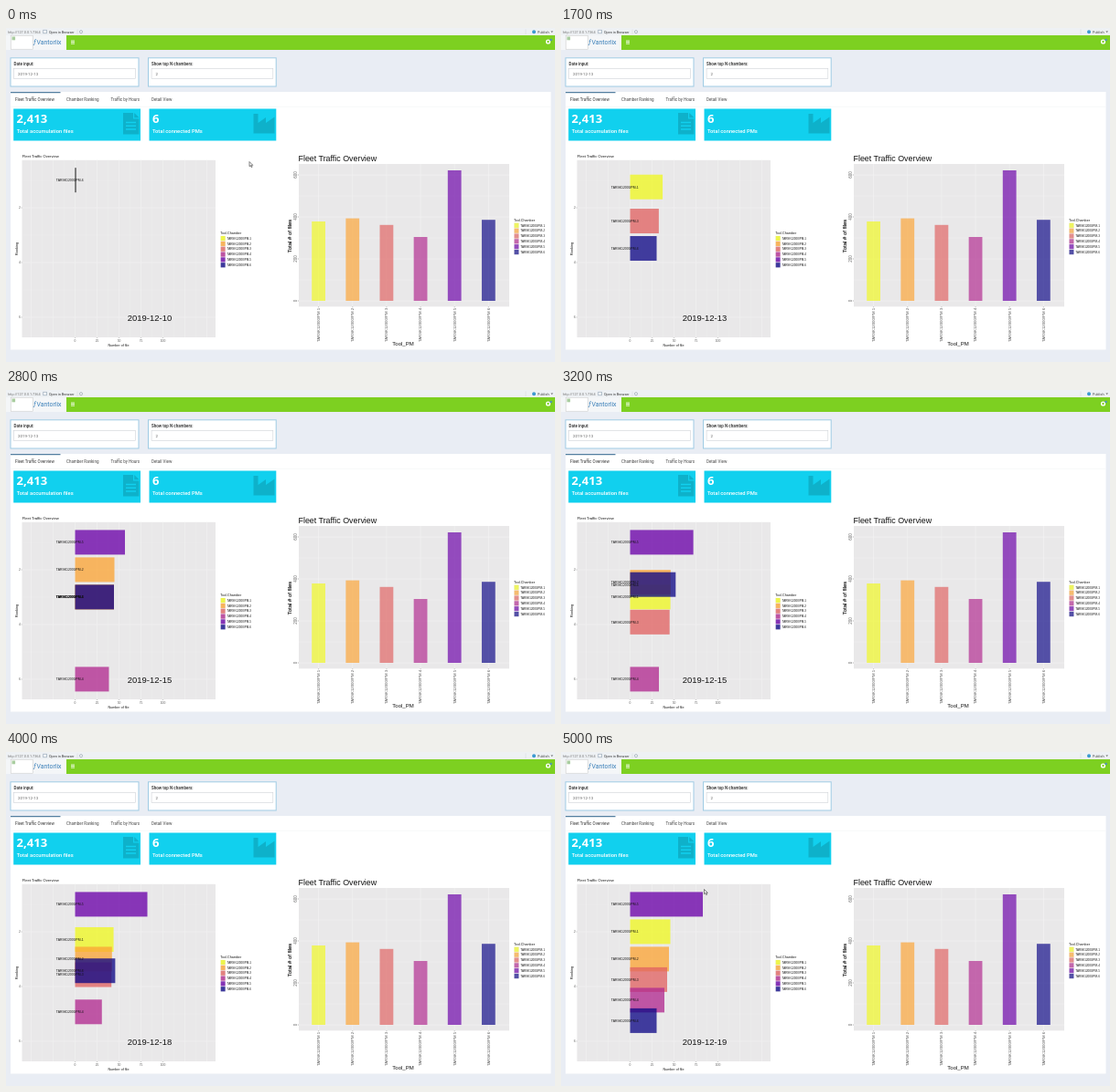
An HTML page that plays this animation: 600 px wide and 366 px high, repeating every 5100 ms.

```html
<!DOCTYPE html>
<html lang="en">
<head>
<meta charset="utf-8">
<title>Fleet dashboard</title>
<style>
  html, body { margin: 0; width: 100%; height: 100%; overflow: hidden; background: #e9edf4; }
  svg { display: block; width: 600px; height: 366px; }
  text { font-family: "Liberation Sans", Arial, sans-serif; white-space: pre; }
  .ui { font-family: Roboto, sans-serif; }
</style>
</head>
<body>
<svg id="stage" viewBox="0 0 600 366"></svg>
<script>
const NS = 'http://www.w3.org/2000/svg';
const stage = document.getElementById('stage');
const COLORS = ['#f0f921', '#fca636', '#e16462', '#b12a90', '#6a00a8', '#0d0887'];
const toolName = i => `TARSK12000/PM-${i + 1}`;

function add(tag, attrs, parent = stage) {
  const el = document.createElementNS(NS, tag);
  for (const k in attrs) el.setAttribute(k, attrs[k]);
  parent.appendChild(el);
  return el;
}
const rect = (x, y, width, height, fill, more) => add('rect', { x, y, width, height, fill, ...more });
const path = (d, fill, more) => add('path', { d, fill, ...more });
const line = (d, stroke, width) => path(d, 'none', { stroke, 'stroke-width': width });
function text(s, x, y, size, fill = '#111', more = {}) {
  const el = add('text', { x, y, 'font-size': size, fill, ...more });
  el.textContent = s;
  return el;
}
const ui = (s, x, y, size, fill, more) => text(s, x, y, size, fill, { class: 'ui', ...more });
const MID = { 'text-anchor': 'middle' };
const upright = (s, x, y, size, fill, more) =>
  text(s, 0, 0, size, fill, { ...MID, transform: `translate(${x} ${y}) rotate(-90)`, ...more });

function drawHeader() {
  rect(0, 0, 600, 8, '#eef1f4');
  ui('http://127.0.0.1:7364', 2, 5.6, 3.8, '#777');
  rect(40.8, 2.2, 3.6, 3.6, '#fff', { stroke: '#8598ab', 'stroke-width': .6 });
  ui('Open in Browser', 47, 5.7, 3.8, '#333');
  line('M78 1.5V7M568 1.5V7', '#d0d5da', .5);
  add('circle', { cx: 82, cy: 4.2, r: 1.6, fill: 'none', stroke: '#9aa7b2', 'stroke-width': .7 });
  add('circle', { cx: 577, cy: 4.2, r: 2, fill: '#3d9ad1' });
  ui('Publish', 581, 5.7, 3.8, '#444');
  path('M595.5 3.5h2.4l-1.2 1.5z', '#555');

  rect(0, 8, 600, 16, '#7dd021');
  rect(0, 8, 66, 16, '#f4f6f8');
  rect(5.2, 8.2, 24, 15, '#fff', { stroke: '#c4c4c4', 'stroke-width': .5 });
  rect(6.5, 9.5, 3.6, 3.8, '#a9cda0');
  ui('ƒ', 30.3, 18.3, 7.2, '#3a7fb8', { 'font-style': 'italic' });
  ui('Vantorlix', 33.5, 18.3, 6.9, '#3a7fb8');
  line('M71 14H75M71 15.6H75M71 17.2H75', '#fff', .8);
  add('circle', { cx: 592.5, cy: 15, r: 1.9, fill: 'none', stroke: '#fff', 'stroke-width': 1.4 });
  add('circle', { cx: 595.6, cy: 13, r: 1.2, fill: '#4f8fc0' });
}

function drawInput(x, width, label, value) {
  rect(x, 32.8, width, 31.2, '#fff', { stroke: '#9fcbe4', 'stroke-width': 1 });
  ui(label, x + 3.6, 41.2, 4.5, '#222', { 'font-weight': 500 });
  rect(x + 3.6, 44.5, width - 7, 11, '#fff', { stroke: '#cfd3d8', 'stroke-width': .6 });
  ui(value, x + 8, 51.6, 4.4, '#666');
}

function drawCard(x, value, label) {
  rect(x, 88.5, 138.8, 35, '#11d0ee');
  text(value, x + 3.4, 103.7, 13, '#fff', { 'font-weight': 700, style: 'font-family:"Open Sans",sans-serif' });
  ui(label, x + 3.6, 114.8, 5.8, '#fff', { 'font-weight': 500 });
}

function drawPanel() {
  rect(5, 70, 590.5, 282.5, '#fff');
  line('M5 86.2H595.5', '#f1f3f5', .6);
  line('M5 70.7H59.5', '#547fa0', 1.3);
  ui('Fleet Traffic Overview', 10, 80, 4.5, '#333');
  ui('Chamber Ranking', 66, 80, 4.5, '#444');
  ui('Traffic by Hours', 114.5, 80, 4.5, '#444');
  ui('Detail View', 159, 80, 4.5, '#444');
  drawCard(8.2, '2,413', 'Total accumulation files');
  drawCard(156.5, '6', 'Total connected PMs');
  path('M128 93h11v6.5h6.5v17H128z', '#0eb1ca');
  path('M140.2 93l5.3 5.3h-5.3z', '#0eb1ca');
  line('M131 103.5H142M131 107.3H142M131 111H142', '#11d0ee', 1.4);
  path('M270.5 115.5V94h5v10l8.5-6v6l9.5-6.5v18z', '#0eb1ca');
}

function drawLegend(x, y, opacity) {
  text('Tool.Chamber', x, y, 3.7);
  COLORS.forEach((c, i) => {
    const top = y + 2 + i * 5.85;
    rect(x + .3, top, 5.3, 5.6, '#ebebeb');
    rect(x + .5, top + .2, 4.9, 5.2, c, { opacity });
    text(toolName(i), x + 7.3, top + 4, 3.05);
  });
}

function drawRankingPlot() {
  text('Fleet Traffic Overview', 17.8, 142, 4.15);
  rect(17.5, 144.8, 211.5, 194.2, '#e9e8e9');
  for (let i = -4; i <= 12; i++) line(`M${75.5 + i * 12} 144.8V339`, '#f1f1f1', i % 2 ? .3 : .6);
  for (let r = 1; r <= 6; r++) line(`M17.5 ${137 + r * 30}H229`, '#f1f1f1', r % 2 ? .3 : .6);
  [2, 4, 6].forEach(r => {
    text(r, 14.8, 138.2 + r * 30, 3.3, '#555', MID);
    line(`M16.6 ${137 + r * 30}h.9`, '#555', .4);
  });
  [0, 25, 50, 75, 100].forEach(v => {
    text(v, 75.5 + v * .96, 344, 3.3, '#555', MID);
    line(`M${75.5 + v * .96} 339v.9`, '#555', .4);
  });
  text('Number of file', 123, 348.6, 3.7, '#111', MID);
  upright('Ranking', 13.2, 242, 4);
  drawLegend(234.2, 225.7, .78);
}

function drawTotals() {
  text('Fleet Traffic Overview', 319.5, 145.7, 8.9);
  rect(320, 149, 230, 156.3, '#e9e8e9');
  for (let i = 0; i < 7; i++) line(`M320 ${299 - i * 23}H550`, '#f3f3f3', i % 2 ? .35 : .7);
  for (let i = 0; i < 4; i++) {
    const y = 299 - i * 46;
    upright(i * 200, 317.6, y, 4.5, '#666');
    line(`M318.8 ${y}h1.2`, '#555', .4);
  }
  [212, 208.6, 215.8, 229, 156, 210.2].forEach((top, i) => {
    const x = 341.6 + i * 37.15;
    line(`M${x} 149V305.3`, '#f3f3f3', .7);
    line(`M${x} 305.3v1`, '#555', .4);
    rect(x - 7.4, top, 14.8, 299 - top, COLORS[i], { opacity: .68 });
    upright(toolName(i).replace('-', ' '), x + 1.4, 325.5, 4.3, '#555');
  });
  upright('Total # of files', 311.8, 228, 6, '#111', { 'font-weight': 500, stroke: '#111', 'stroke-width': .12 });
  text('Tool_PM', 434, 347.6, 6, '#111', MID);
  drawLegend(555, 211.5, .68);
}

drawHeader();
drawInput(5, 140, 'Date input:', '2019-12-13');
drawInput(155.5, 139.7, 'Show top N chambers:', '2');
drawPanel();
drawRankingPlot();
drawTotals();

// Each state: day, then [rank, bar length] per chamber.
const STATES = [
  [10, 0, 0, 0, 0, 0, [1, 0]],
  [12, 0, 0, 0, 0, 0, [1, 7.5]],
  [13, [1, 30], 0, [2, 27], 0, 0, [3, 25]],
  [14, [2, 53], [3, 46], [4, 45], [6, 30], [1, 56], [5, 41.5]],
  [15, [3, 42.5], [2, 43], [3, 42.5], [6, 37], [1, 54.5], [3, 42.5]],
  [16, [3, 46], [3, 46], [5, 44], [6, 25], [1, 86.5], [2, 58.5]],
  [18, [2, 40.5], [3, 38], [3, 38], [4.5, 31], [1, 76], [4, 38]],
  [19, [2, 44], [3, 42.5], [3.75, 40.5], [4.5, 37.5], [1, 79.5], [5.25, 29]]
];
const ENTER = [1238, 2250, 1238, 2250, 2250, 0];
const LOOP = 5100, TICK = 100, GAP = 5000 / 7, HOLD = 190;

const bars = COLORS.map(c => rect(75.5, 0, 0, 27, c, { opacity: .77 }));
const zeroLine = line('M76 153.2V180.2', '#111', 1);
const labels = COLORS.map((c, i) => text(toolName(i), 69.8, 0, 3.45, '#111', MID));
const day = text('', 157, 320.7, 9.45, '#111', MID);
const cursor = path('M0 0V5.2L1.3 4.1L2.2 6.1L3.1 5.7L2.2 3.8H3.8Z', '#fff', { stroke: '#333', 'stroke-width': .6 });

function render(t) {
  const i = Math.min(6, Math.floor(t / GAP));
  const k = Math.min(1, Math.max(0, (t - i * GAP - HOLD) / (GAP - 2 * HOLD)));
  day.textContent = `2019-12-${STATES[Math.round(t / GAP)]?.[0] ?? 19}`;
  bars.forEach((bar, n) => {
    const to = STATES[i + 1][n + 1], from = STATES[i][n + 1] || to;
    const on = to && t >= ENTER[n];
    bar.style.display = labels[n].style.display = on ? '' : 'none';
    if (!on) return;
    const [rank, length] = from.map((v, j) => v + (to[j] - v) * k);
    const y = 137 + rank * 30;
    bar.setAttribute('y', y - 13.6);
    bar.setAttribute('width', length);
    labels[n].setAttribute('y', y + 1.3);
  });
  zeroLine.style.display = t < HOLD + TICK ? '' : 'none';
  cursor.style.display = t < TICK || t >= 4900 ? '' : 'none';
  cursor.setAttribute('transform', t < TICK ? 'translate(266 146.5)' : 'translate(156.5 150.5)');
}

const start = performance.now();
function loop() {
  const t = (performance.now() - start) % LOOP;
  render(Math.floor(t / TICK) * TICK);
  requestAnimationFrame(loop);
}
loop();
</script>
</body>
</html>
```
